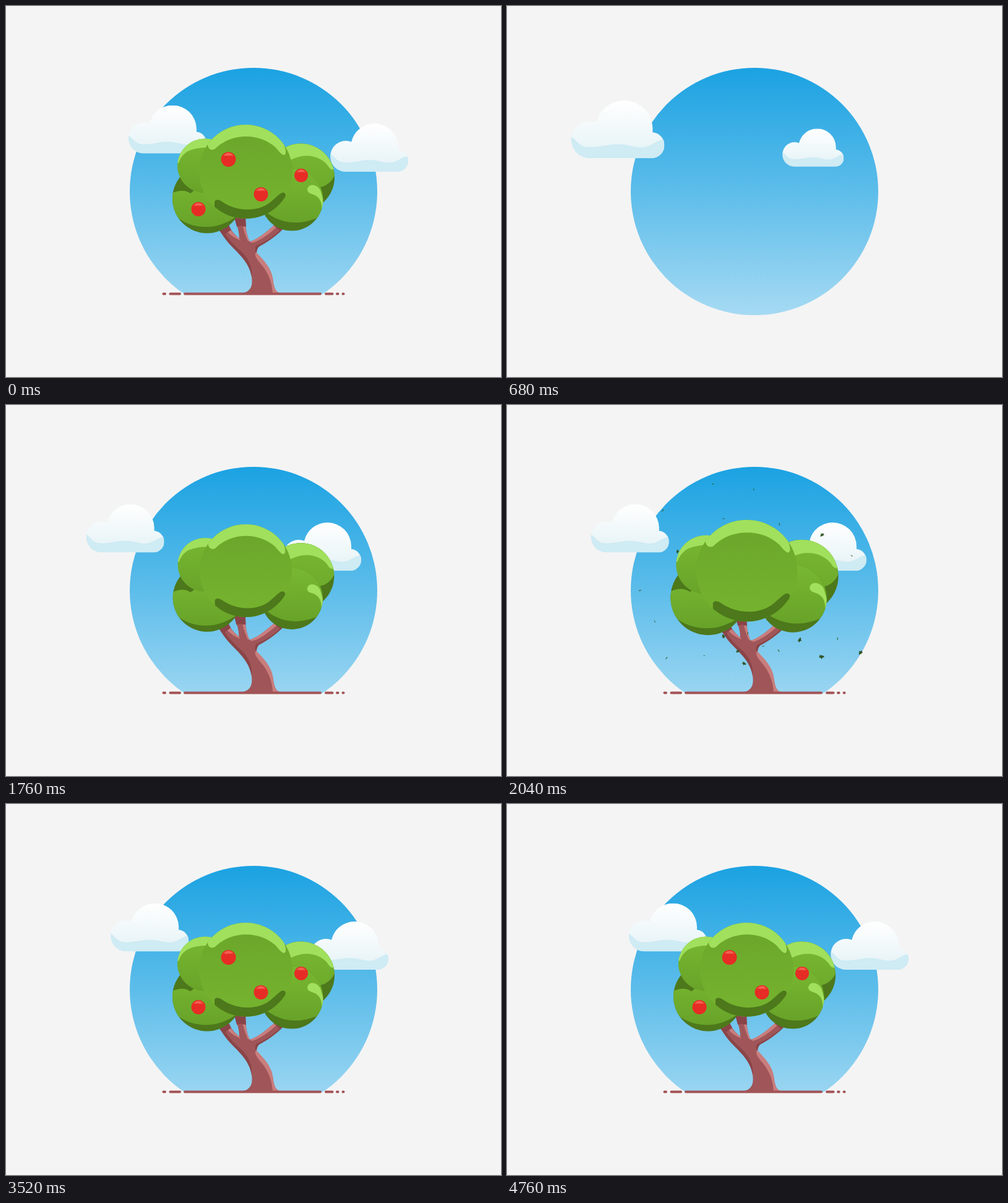
Animation, 800 px wide and 600 px high, one loop 4800 ms. Source, as an HTML page:

```html
<!DOCTYPE html>
<html lang="en">
<head>
<meta charset="utf-8">
<title>Apple tree</title>
<style>
  html, body { margin: 0; width: 100%; height: 100%; overflow: hidden; background: #f4f4f4; }
  svg { display: block; width: 100vw; height: 100vh; }
  .light { fill: #a0e05c; }
  .dark { fill: #4d781b; }
  .leaf { fill: #2f5526; }
</style>
</head>
<body>
<svg viewBox="0 0 800 600">
  <defs>
    <linearGradient id="sky" x2="0" y2="1">
      <stop stop-color="#1ba2e2"/><stop offset=".5" stop-color="#5dbdea"/><stop offset="1" stop-color="#a6daf3"/>
    </linearGradient>
    <linearGradient id="mist" x2="0" y2="78" gradientUnits="userSpaceOnUse">
      <stop stop-color="#fff"/><stop offset="1" stop-color="#e4f2f6"/>
    </linearGradient>
    <linearGradient id="green" x2="0" y2="1">
      <stop stop-color="#6aa52a"/><stop offset="1" stop-color="#76b42f"/>
    </linearGradient>
    <linearGradient id="lush" x2="0" y2="1">
      <stop stop-color="#78b831"/><stop offset="1" stop-color="#68a329"/>
    </linearGradient>
    <clipPath id="puff">
      <circle cx="25" cy="53" r="25"/><circle cx="71.5" cy="38.5" r="38.5"/><circle cx="108.5" cy="60.5" r="17.5"/>
      <path d="M25 45H72V38H110V70L108 78H25Z"/>
    </clipPath>
    <clipPath id="inA"><ellipse cx="322" cy="258.500" rx="45" ry="44"/></clipPath>
    <clipPath id="inB"><circle cx="476.500" cy="277" r="54.500"/></clipPath>
    <clipPath id="inC"><circle cx="325" cy="311.500" r="56"/></clipPath>
    <clipPath id="inD"><circle cx="462" cy="313" r="50.500"/></clipPath>
    <clipPath id="inM"><ellipse cx="387.500" cy="268" rx="75.500" ry="76"/></clipPath>
    <clipPath id="reveal"><rect id="wipe" y="455" height="20"/></clipPath>
    <g id="cloud" clip-path="url(#puff)">
      <path fill="url(#mist)" d="M0 0H126V78H0Z"/>
      <path fill="#cfebf4" d="M0 49C10 55 10 64 28 63C45 62 50 59 64 59C78 59 88 65 100 63C112 60 116 53 126 53V80H0Z"/>
    </g>
    <g id="apple">
      <circle r="11.500" fill="#e62c25"/>
      <path fill="#f4604f" d="M-8-5Q-5-10 0-10Q5-10 8-5Q4-7 2-5Q0-7-2-5Q-4-7-8-5Z"/>
    </g>
    <path id="leaf" d="M-4 0L-2-1-1-4 1-2 4-2 3 1 4 3 1 2 0 4-1 2-4 3Z"/>
  </defs>

  <circle cx="400" cy="300" r="200" fill="url(#sky)" data-pop="20 1.25 400 300"/>
  <path id="cover" fill="#f4f4f4" d="M190 466H610V510H190Z"/>
  <g id="cloud1"><use href="#cloud" data-pop="450 1.2 63 39"/></g>
  <g id="cloud2"><use href="#cloud" data-pop="560 1.2 63 39"/></g>

  <g data-pop="1300 1.08 412 465">
    <path fill="#a05659" d="M380 465C396 462 399 453 397 438C394 418 380 404 368 392C359 383 352 374 344 361L356 348C362 362 370 370 377 376C377 366 374 356 369 341L386 338C387 358 389 372 394 381C405 378 418 368 434 354L449 357C436 373 420 383 409 389C404 393 403 399 406 402C416 412 428 424 431 440C433 455 435 464 446 465Z"/>
    <path fill="#8a4548" d="M344 361C352 374 359 383 368 392C380 404 394 418 397 438C399 420 390 405 377 394C366 384 357 374 351 362ZM449 357C433 373 418 382 404 388Q401 396 405 401Q405 393 409 389C420 383 437 373 451 357Z"/>
    <path fill="#c97e7d" d="M404 398C416 410 429 424 431 440C433 455 435 464 446 465L431 465C430 448 425 434 415 421C407 411 400 404 404 398ZM394 381C405 378 418 368 434 354L438 357C423 371 408 381 397 383ZM356 352C362 363 370 370 377 376L379 379C368 375 359 368 352 357ZM383 357L387 356Q389 372 394 381L391 380Q386 370 383 357Z"/>
    <path fill="#8a4448" d="M368 338H387L388 357Q380 354 373 357ZM343 360L357 348 364 362 354 369ZM432 354L450 352 443 364Z"/>
  </g>

  <g id="leaves"></g>

  <g clip-path="url(#inB)" data-pop="1620 1.25 476.5 277">
    <path class="dark" d="M420 220H535V335H420Z"/>
    <path fill="url(#lush)" d="M420 220H535V262Q529 291 503 294L490 340H420Z"/>
    <path class="light" d="M440 215H535V262Q527 268 522 261C512 244 486 236 462 248L440 256Z"/>
  </g>
  <g clip-path="url(#inC)" data-pop="1620 1.25 325 311.5">
    <path class="dark" d="M265 250H385V370H265Z"/>
    <path fill="url(#lush)" d="M262 306Q284 293 298 303L340 270H385V330Q365 350 338 356Q300 362 273 339L262 330Z"/>
  </g>
  <g clip-path="url(#inA)" data-pop="1620 1.25 322 258.5">
    <path fill="url(#lush)" d="M275 210H370V305H275Z"/>
    <path class="light" d="M270 210H370V236C335 225 306 228 292 236Q282 243 279 254L270 250Z"/>
  </g>
  <g clip-path="url(#inD)" data-pop="1620 1.25 462 313">
    <path class="dark" d="M410 260H515V366H410Z"/>
    <path fill="url(#lush)" d="M410 260H515V337Q476 358 443 346Q426 340 415 328Z"/>
    <path class="light" d="M487 297C488 287 502 287 508 298L516 325 510 328C511 315 505 307 494 304Q487 302 487 297Z"/>
  </g>
  <g clip-path="url(#inM)" data-pop="1620 1.25 387.5 268">
    <path fill="url(#green)" d="M310 190H465V346H310Z"/>
    <path class="light" d="M326 222C325 232 334 236 340 229C366 205 410 205 436 229C440 234 446 241 449 241C454 240 452 232 450 226V180H320Z"/>
    <path class="dark" d="M337 319C336 312 344 312 350 317C374 333 405 333 425 319C433 313 440 305 446 302C452 301 453 305 451 312V350H337Z"/>
  </g>

  <g data-pop="2200 1.25 359.5 248"><use href="#apple" transform="translate(359.5 248) scale(1.04)"/></g>
  <g data-pop="2290 1.25 412 304.5"><use href="#apple" transform="translate(412 304.5)"/></g>
  <g data-pop="2600 1.25 477 274"><use href="#apple" transform="translate(477 274) scale(.96)"/></g>
  <g data-pop="2765 1.25 311 328.5"><use href="#apple" transform="translate(311 328.5)"/></g>

  <path clip-path="url(#reveal)" fill="none" stroke="#a25356" stroke-width="4" stroke-linecap="round" d="M254.500 465.500H257M265.500 465.500H281M289 465.500H508M517 465.500H527.500M535 465.500H536.500M544.500 465.500H545.500"/>
</svg>
<script>
const LOOP = 4800;
const $ = id => document.getElementById(id);
const clamp = u => Math.min(1, Math.max(0, u));
const smooth = u => (u = clamp(u), u * u * (3 - 2 * u));
const span = (t, a, b) => smooth((t - a) / (b - a));

// Grow past full size, then settle.
function pop(t, start, over) {
  const u = t - start;
  return u < 200 ? over * smooth(u / 200) : over + (1 - over) * smooth((u - 200) / 360);
}

const pops = [...document.querySelectorAll('[data-pop]')]
  .map(el => [el, ...el.dataset.pop.split(' ').map(Number)]);

// x, y and size of each leaf in mid-flight
const leaves = [
  [333, 128, .5], [399, 137, .5], [252, 171, .6], [350, 184, .5], [440, 193, .6], [509, 210, .8],
  [557, 244, .5], [276, 237, .7], [215, 300, .6], [239, 350, .5], [258, 409, .6], [319, 405, .4],
  [350, 374, .8], [373, 398, .7], [383, 418, .8], [389, 369, .6], [414, 390, .5], [439, 397, .6],
  [473, 380, .9], [508, 407, 1], [534, 378, .6], [571, 400, .9]
].map(([x, y, size], i) => {
  const el = document.createElementNS('http://www.w3.org/2000/svg', 'use');
  el.setAttribute('href', '#leaf');
  el.setAttribute('class', 'leaf');
  $('leaves').append(el);
  return { el, dx: x - 395, dy: y - 290, size, turn: i * 67 };
});

// Eases into a steady drift.
function drift(t) {
  const lag = Math.max(0, 1900 - t);
  return 197 + .0225 * (t - 4760) + .0225 * lag * lag / 3062;
}

function drawLeaves(t) {
  const age = t - 1720;
  $('leaves').setAttribute('opacity', age > 0 ? 1 - span(t, 2250, 2680) : 0);
  if (age <= 0 || t > 2700) return;
  const reach = 1.3 * (1 - Math.exp(-age / 218));
  const fall = 6e-5 * Math.max(0, t - 2040) ** 2;
  for (const { el, dx, dy, size, turn } of leaves) {
    const flat = size < .65 ? .35 : .9;
    el.setAttribute('transform',
      `translate(${395 + dx * reach} ${290 + dy * reach + fall}) rotate(${turn + (t - 2040) * .25}) scale(${size} ${size * flat})`);
  }
}

function draw(now) {
  let t = now % LOOP;
  if (t < 40) t += LOOP;
  for (const [el, start, over, x, y] of pops) {
    const s = pop(t, start, over);
    el.setAttribute('transform', `translate(${x} ${y}) scale(${s}) translate(${-x} ${-y})`);
  }
  const x = drift(t);
  $('cloud1').setAttribute('transform', `translate(${x} 160.500)`);
  $('cloud2').setAttribute('transform', `translate(${x + 317 + (t - 1240) * .0026} 190)`);
  $('cover').setAttribute('opacity', span(t, 1090, 1330));
  const half = 152 * span(t, 800, 1160);
  $('wipe').setAttribute('x', 400 - half);
  $('wipe').setAttribute('width', 2 * half);
  drawLeaves(t);
}

const began = performance.now();
function tick() {
  draw(performance.now() - began);
  requestAnimationFrame(tick);
}
tick();
</script>
</body>
</html>
```
